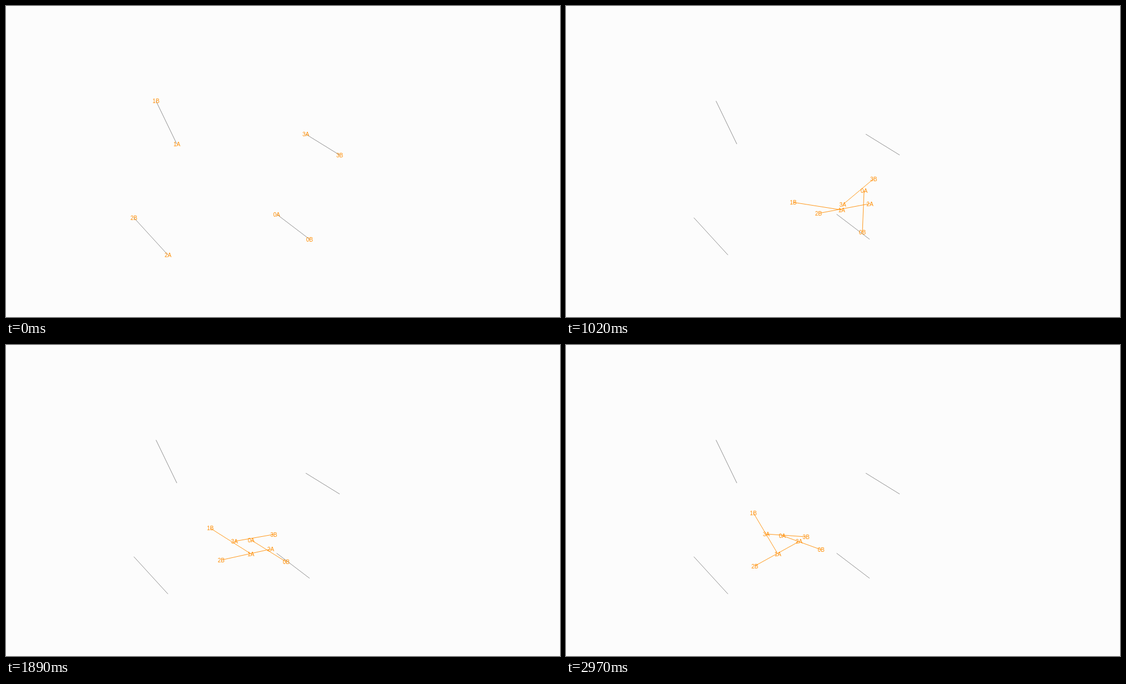
These frames come from a looping animation (998x561 px, 3600 ms). An HTML page:

```html
<!DOCTYPE html>
<html lang="en">
<head>
<meta charset="utf-8">
<title>Relaxing bars</title>
<style>
  html, body { margin: 0; width: 100%; height: 100%; overflow: hidden; background: #fcfcfc; }
  svg { display: block; width: 998px; height: 561px; }
  .rest { stroke: #222; stroke-width: .5; }
  .bar { stroke: #ff8c00; stroke-width: .9; }
  text { font: 10px Arial, "Liberation Sans", sans-serif; fill: #ff8c00; text-anchor: middle; }
</style>
</head>
<body>
<svg id="stage" viewBox="0 0 998 561"></svg>
<script>
const STEP = 30, LOOP = 3600;
const SETTLED = 43, LAST = 99;          // steps: bars have met, bars stop
const MEETING = [0, 9, 25, SETTLED];    // steps of the poses on the way in
const DRIFT = 1.4, SAG = 14;

// Each pose is centre x, centre y, angle in degrees.
// stretch: extra length at full pull; swing: how early the last turn happens.
const bars = [
  { length: 74.5, stretch: 2, swing: 3, end: [424.5, 356.5, 20],
    path: [[517.2, 398.2, 37.3], [538.2, 349.3, 92.6], [548.2, 357.5, 111], [515, 378, 65.3]] },
  { length: 86.3, stretch: 9, swing: 1.05, end: [359.5, 339.7, -120.7],
    path: [[289, 210.2, -115.8], [315.5, 319, -113.9], [434.5, 355, -167.3], [443.2, 359, -163.6]] },
  { length: 91.2, stretch: 13, swing: .65, end: [380, 376.5, 151],
    path: [[261, 415.5, 227.6], [412.8, 392, 170], [504, 361.2, 164.2], [477, 373, 173]] },
  { length: 71.7, stretch: 3, swing: 1.4, end: [396.7, 343.5, 4],
    path: [[570.5, 250, 31.7], [560.7, 302, -40.3], [560.7, 319, -56.6], [490, 345.2, -22]] }
];

const easeOut = (u, power) => 1 - (1 - u) ** power;

// Smooth path through the meeting poses, then an ease-out to the end value
function track(values, end, power) {
  const gap = i => MEETING[i + 1] - MEETING[i];
  const slope = i => (values[i + 1] - values[i]) / gap(i);
  const inner = i => (gap(i) * slope(i - 1) + gap(i - 1) * slope(i)) / (gap(i) + gap(i - 1));
  const final = values[3], settle = LAST - SETTLED;
  const speed = [2 * slope(0) - inner(1), inner(1), inner(2), power * (end - final) / settle];
  return t => {
    if (t >= SETTLED) return final + (end - final) * easeOut((t - SETTLED) / settle, power);
    const i = MEETING.findIndex(m => t < m) - 1;
    const h = gap(i), u = (t - MEETING[i]) / h, v = 1 - u;
    return values[i] * v * v * (1 + 2 * u) + values[i + 1] * u * u * (1 + 2 * v)
      + h * u * v * (speed[i] * v - speed[i + 1] * u);
  };
}

function makeMotion({ path, end, length, stretch, swing }) {
  const [x, y, angle] = [DRIFT, DRIFT, swing].map(
    (power, k) => track(path.map(pose => pose[k]), end[k], power));
  return t => {
    const pull = t / 9 * Math.exp(1 - t / 9);
    const half = (length + stretch * pull) / 2;
    const p = easeOut(Math.max(0, t - SETTLED) / (LAST - SETTLED), DRIFT);
    const turn = angle(t) * Math.PI / 180;
    const dx = half * Math.cos(turn), dy = half * Math.sin(turn);
    const cx = x(t), cy = y(t) + SAG * p * (1 - p);
    return { x1: cx - dx, y1: cy - dy, x2: cx + dx, y2: cy + dy };
  };
}

const stage = document.getElementById('stage');
function set(node, attrs) {
  for (const key in attrs) node.setAttribute(key, attrs[key]);
}
function add(tag, attrs, text = '') {
  const node = document.createElementNS('http://www.w3.org/2000/svg', tag);
  set(node, attrs);
  node.textContent = text;
  return stage.appendChild(node);
}

for (const bar of bars) {
  bar.at = makeMotion(bar);
  add('line', { class: 'rest', ...bar.at(0) });
}
for (const bar of bars) bar.line = add('line', { class: 'bar' });
bars.forEach((bar, i) => {
  bar.labels = ['A', 'B'].map(name => add('text', { dy: 4 }, i + name));
});

function draw(ms) {
  const step = Math.min(LAST, Math.floor((ms % LOOP) / STEP));
  for (const { at, line, labels: [a, b] } of bars) {
    const p = at(step);
    set(line, { ...p, visibility: step ? 'visible' : 'hidden' });
    set(a, { x: p.x1, y: p.y1 });
    set(b, { x: p.x2, y: p.y2 });
  }
}

let start = null;
function tick(now) {
  start ??= now;
  draw(now - start);
  requestAnimationFrame(tick);
}
draw(0);
requestAnimationFrame(tick);
</script>
</body>
</html>
```
